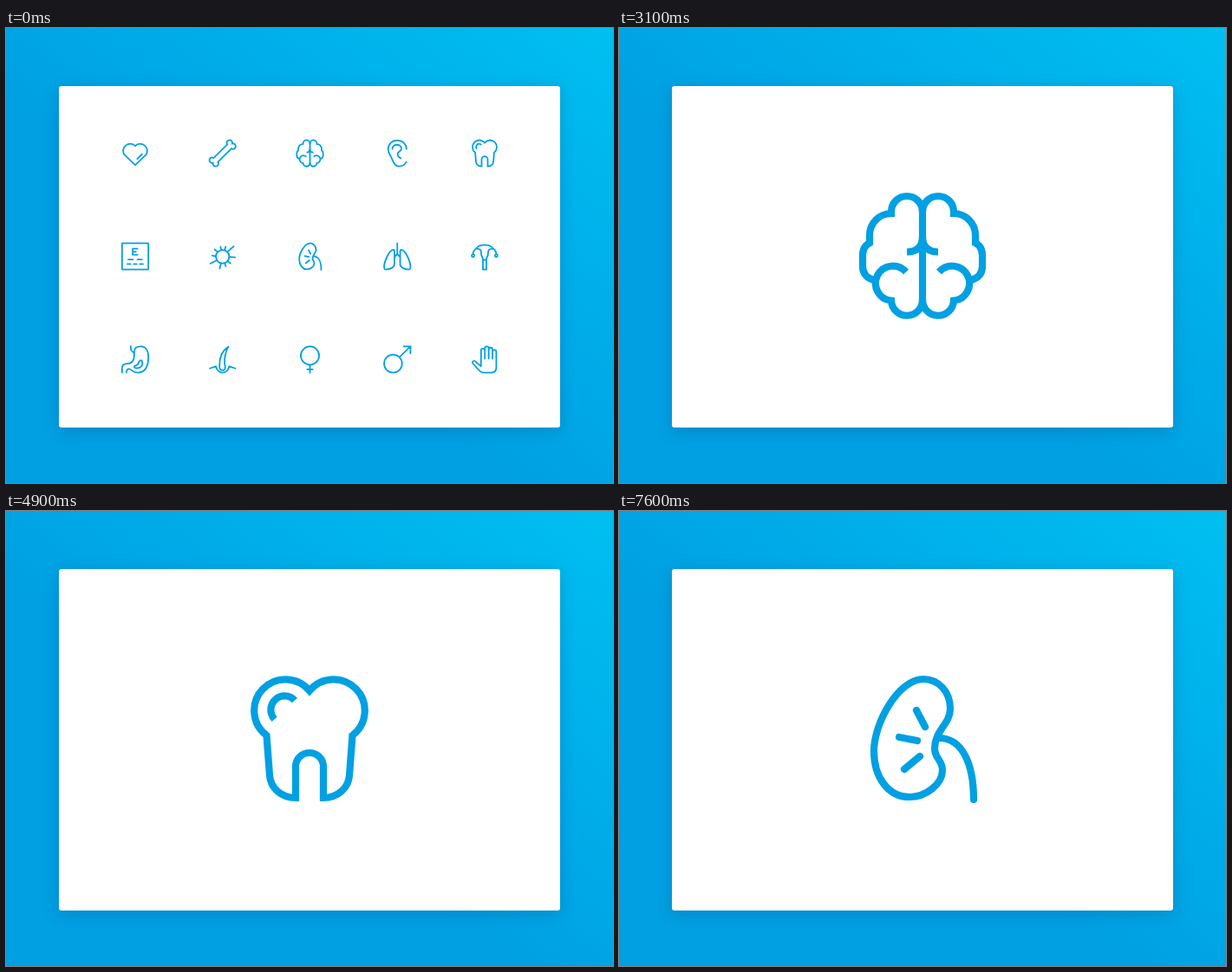
Recreate the animation shown at these times as an HTML page. Size 700x525 px, loop 8 s.

```html
<!DOCTYPE html>
<html lang="en">
<head>
<meta charset="utf-8">
<title>Anatomy icons</title>
<style>
html, body { margin: 0; width: 100%; height: 100%; overflow: hidden; }
body {
  position: relative;
  background: linear-gradient(to top right, #00a0e3 42%, #00bff1 100%);
}
.card {
  position: absolute; left: 61px; top: 66.5px; width: 578px; height: 394px;
  border-radius: 3px; background: #fff;
  box-shadow: 0 4px 18px rgba(0, 60, 110, .24);
}
svg { position: absolute; left: 0; top: 0; width: 700px; height: 525px; }
#icons, #stage {
  fill: none; stroke: #00a0e3; stroke-width: 8.2;
}
.round { stroke-linecap: round; stroke-linejoin: round; }
#icons { animation: overview 8s step-end infinite; }
#stage use { visibility: hidden; animation: show 8s step-end infinite; }
#stage use:last-child { animation-name: showLast; }
@keyframes overview { 0% { visibility: visible } 16.25%, 100% { visibility: hidden } }
@keyframes show { 0% { visibility: visible } 11.25%, 100% { visibility: hidden } }
@keyframes showLast { 0% { visibility: visible } 5%, 100% { visibility: hidden } }
</style>
</head>
<body>
<div class="card"></div>
<svg viewBox="0 0 700 525">
  <defs>
    <g id="heart" class="round">
      <path d="M350 224A37 37 0 0 0 292 269L350 324L408 269A37 37 0 0 0 350 224Z"/>
      <path d="M361 292L386 267"/>
    </g>
    <path id="bone" d="M303.5 287L374.5 216A14.5 14.5 0 1 1 400.5 212A14.5 14.5 0 1 1 396.5 238L325.5 309A14.5 14.5 0 1 1 299.5 313A14.5 14.5 0 1 1 303.5 287Z"/>
    <path id="lobe" d="M350 212A18 18 0 0 0 314 212V214A25 25 0 0 0 289 239V248Q281 252 281 262V275Q281 287 294 291M331 281.5A20 20 0 1 0 314 314.5A18 18 0 0 0 350 313M332 258.5Q350 258 350 241"/>
    <g id="brain">
      <path d="M350 204V322"/>
      <use href="#lobe"/>
      <use href="#lobe" transform="matrix(-1 0 0 1 700 0)"/>
    </g>
    <g id="ear" class="round">
      <path d="M398 240A48 46 0 0 0 302 241C302 262 314 274 322 292C330 312 338 331 358 331C376 331 390 324 397 308"/>
      <path d="M324 240C324 211 372 211 372 240C372 252 352 252 352 266C352 278 358 285 369 288"/>
    </g>
    <g id="tooth">
      <path d="M334 331C318 331 305 320 304 305L300.5 259A36 36 0 1 1 350 207.4A36 36 0 1 1 399.5 259L396 305C395 320 382 331 366 331V295A16 16 0 0 0 334 295Z"/>
      <path d="M309.7 240.3A15.5 15.5 0 0 1 333 218.5"/>
    </g>
    <g id="chart" class="round">
      <rect x="281" y="194" width="138" height="137" rx="2"/>
      <path d="M362 222H337V254H362M337 238H354M314 279H338M362 279H386M309 303H326M342 303H358M374 303H391"/>
    </g>
    <g id="virus" class="round">
      <circle cx="350" cy="264" r="35"/>
      <path d="M375 239L408 210M385 265L416 268M377 287L391 299M361 298L367 314M342 298L335 326M320 283L287 300M315 262L296 258M324 240L309 226M343 229L339 212M361 230L366 212"/>
    </g>
    <g id="kidney" class="round">
      <path d="M351 194C369 194 382 209 382 228C382 246 364 253 364 274C364 286 373 287 373 299C373 315 354 330 335 330C311 330 294 308 294 277C294 245 322 194 351 194Z"/>
      <path d="M369 262C396 262 409 292 409 333M343 230L353 249M323 261L344 265M347 283L329 298"/>
    </g>
    <path id="lung" d="M331 228C307 228 281 290 281 318C281 329 283 331 291 331C307 331 335 322 335 305V240Q335 228 331 228ZM350 250L335 266"/>
    <g id="lungs" class="round">
      <path d="M350 194V254"/>
      <use href="#lung"/>
      <use href="#lung" transform="matrix(-1 0 0 1 700 0)"/>
    </g>
    <g id="uterus">
      <path d="M289 252C289 236 296 228 306 222C318 196 382 196 394 222C404 228 411 236 411 252"/>
      <path d="M306 222C330 222 332 232 332 248C332 264 341 268 341 276V331H359V276C359 268 368 264 368 248C368 232 370 222 394 222M341 281H359"/>
      <circle cx="289" cy="259" r="7"/>
      <circle cx="411" cy="259" r="7"/>
    </g>
    <g id="stomach" class="round">
      <path d="M327 193V207C327 222 345 220 345 235M281 331V310C281 292 292 285 306 285C330 285 345 275 345 240V222C345 200 362 194 380 194C404 194 419 215 419 250C419 300 400 331 362 331C335 331 330 312 318 312C306 312 304 320 304 331"/>
      <path d="M384 268C396 290 380 308 358 308C345 308 340 300 350 295C366 292 368 284 370 275Q376 262 384 268Z"/>
    </g>
    <g id="hair" class="round">
      <path d="M380 196C350 215 334 250 334 292C332 310 338 319 350 319C362 319 367 308 362 292C357 260 366 220 380 196Z"/>
      <path d="M283 309L315 298C320 318 328 331 350 331C372 331 380 318 385 298L417 309"/>
    </g>
    <g id="female">
      <circle cx="350" cy="242" r="48"/>
      <path d="M350 290V335M332 314H368"/>
    </g>
    <g id="male">
      <circle cx="328" cy="284" r="47"/>
      <path d="M361 251L419 194M380 194H419V234"/>
    </g>
    <path id="hand" class="round" d="M331 298V215A10 10 0 0 1 351 215V258M351 215V204A10 10 0 0 1 371 204V258M371 210A10 10 0 0 1 391 210V258M391 222A10 10 0 0 1 411 222V305C411 322 402 331 386 331H342C330 331 320 320 288 283C282 274 294 266 302 273L331 298"/>
  </defs>
  <g id="icons"></g>
  <g id="stage"></g>
</svg>
<script>
const names = ["heart", "bone", "brain", "ear", "tooth", "chart", "virus", "kidney",
  "lungs", "uterus", "stomach", "hair", "female", "male", "hand"];
const sequence = ["bone", "heart", "brain", "ear", "tooth", "chart", "virus", "kidney"];

function place(parent, name) {
  const use = document.createElementNS("http://www.w3.org/2000/svg", "use");
  use.setAttribute("href", "#" + name);
  document.getElementById(parent).append(use);
  return use;
}

names.forEach((name, i) => {
  const x = 149 + (i % 5) * 100.75;
  const y = 144.5 + Math.floor(i / 5) * 119;
  place("icons", name).setAttribute("transform",
    `translate(${x} ${y}) scale(.22) translate(-350 -262.5)`);
});

// Negative delays put every icon into the running loop from the start.
sequence.forEach((name, i) => {
  place("stage", name).style.animationDelay = 1300 + i * 900 - 8000 + "ms";
});
</script>
</body>
</html>
```
